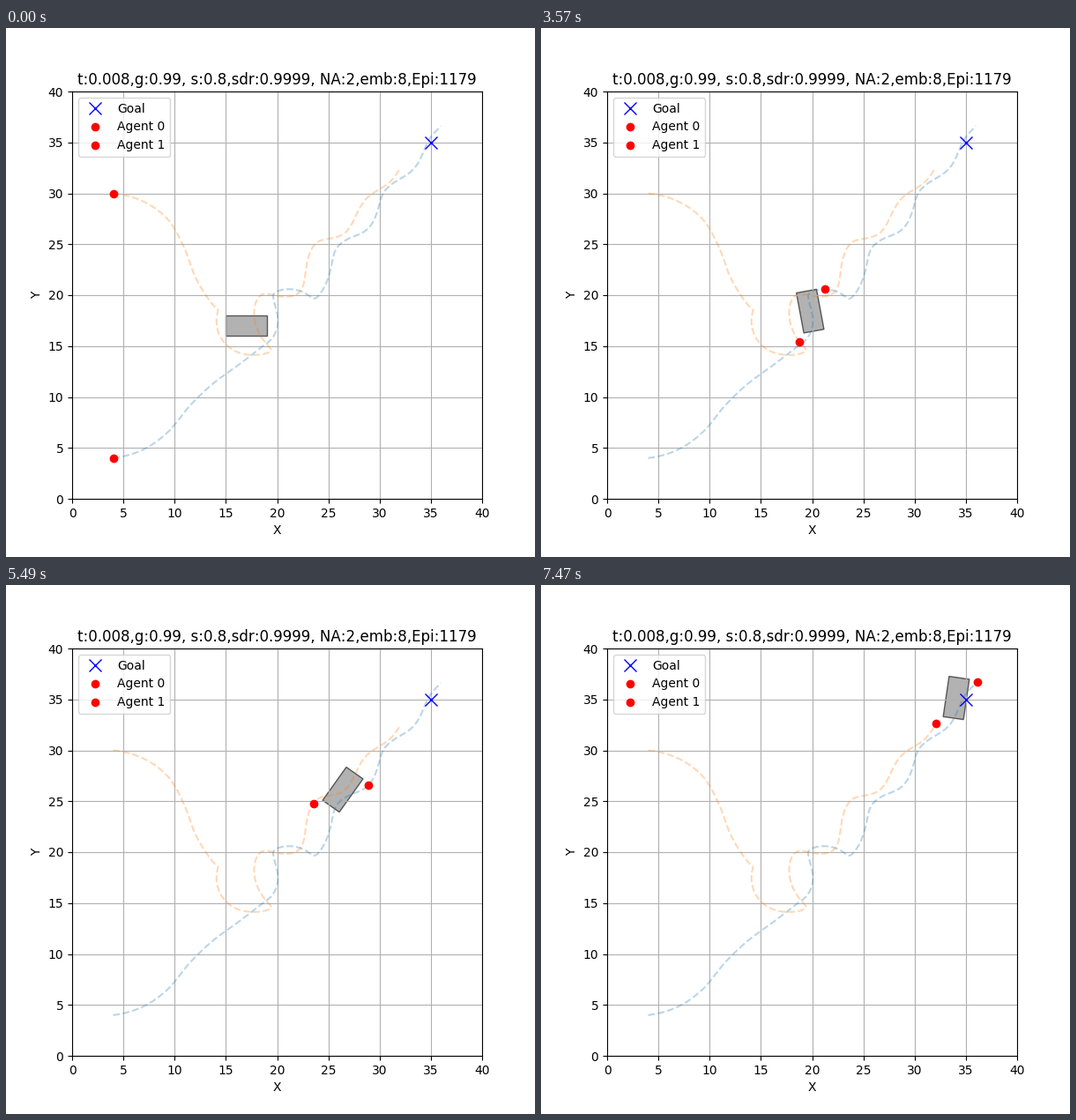
Animation, 600 px wide and 600 px high, one loop 7500 ms. Source, as a matplotlib script:

```python
import numpy as np
import matplotlib.pyplot as plt
from matplotlib.animation import FuncAnimation
from matplotlib.patches import Polygon

plt.rcParams["text.kerning_factor"] = 6

FRAMES, INTERVAL = 250, 30
GRAB = 79.5                          # step at which the agents take the box
REACH = 2.855                        # half the distance between them while carrying
TILT = 36                            # box angle minus the pair's angle
BOX = np.array([(-2, -1), (2, -1), (2, 1), (-2, 1)])
BOX_START = np.array([17, 17])
BOX_SHIFT = np.array([0.45, 0.11])   # box centre relative to the pair's midpoint

# Waypoints passed at even intervals on the way to the box
APPROACH = [
    [(4, 4), (6.97, 4.85), (9.4, 6.61), (11.44, 9.09), (13.68, 11.26),
     (16.3, 13.2), (18.83, 15.17)],
    [(4, 30), (6.97, 29.19), (9.36, 27.41), (10.92, 24.69), (12.03, 21.75),
     (13.33, 19.57), (14.27, 18.59)],
]
# Midpoint of the pair while carrying: step, x, y
CARRY = np.array([
    (GRAB, 16.55, 16.88), (95, 17.81, 16.52), (105, 19.11, 17.01),
    (119, 20, 18.01), (131, 20.65, 19.31), (159, 23.96, 22.42),
    (183, 26.24, 25.71), (206, 29.08, 28.74), (249, 34.11, 34.68),
])
# The pair swings between these turning points: step, degrees
SWING = np.array([(70, -54), (110.5, 86), (136, 0), (160, 50), (184, 18.5),
                  (203, 47), (222, 33), (241, 48), (260, 42)])


def segment(times, t):
    """Index of the interval holding t, its length and the fraction passed."""
    i = int(np.clip(np.searchsorted(times, t) - 1, 0, len(times) - 2))
    h = times[i + 1] - times[i]
    return i, h, (t - times[i]) / h


def spline(times, points, t):
    """Smooth curve through the points."""
    p = np.array(points, float)
    m = np.gradient(p, times, axis=0, edge_order=2)
    i, h, s = segment(times, t)
    r = 1 - s
    return ((1 + 2 * s) * r * r * p[i] + s * r * r * h * m[i]
            + s * s * (3 - 2 * s) * p[i + 1] - s * s * r * h * m[i + 1])


def swing(t):
    """Cosine easing from one turning point to the next."""
    i, _, s = segment(SWING[:, 0], t)
    a, b = SWING[i:i + 2, 1]
    return a + (b - a) * (1 - np.cos(np.pi * s)) / 2


def rotate(points, deg):
    c, s = np.cos(np.radians(deg)), np.sin(np.radians(deg))
    return points @ np.array([[c, s], [-s, c]])


def pose(step):
    """Positions of both agents and the corners of the box."""
    if step < GRAB:
        times = np.linspace(1, GRAB, len(APPROACH[0]))
        return (*(spline(times, path, step) for path in APPROACH), BOX_START + BOX)
    mid = spline(CARRY[:, 0], CARRY[:, 1:], step)
    angle = swing(step)
    arm = rotate(np.array([REACH, 0]), angle)
    return mid + arm, mid - arm, mid + rotate(BOX + BOX_SHIFT, angle + TILT)


poses = [pose(max(i, 1)) for i in range(FRAMES)]

fig, ax = plt.subplots(figsize=(6, 6), dpi=100)
ax.set(xlim=(0, 40), ylim=(0, 40), xlabel="X", ylabel="Y",
       title="t:0.008,g:0.99, s:0.8,sdr:0.9999, NA:2,emb:8,Epi:1179")
ax.set_xticks(range(0, 41, 5))
ax.set_yticks(range(0, 41, 5))
ax.grid(True)

for n in (0, 1):
    ax.plot(*np.array([p[n] for p in poses[1:-1]]).T, "--", color=f"C{n}", alpha=0.3)
ax.plot(35, 35, "bx", markersize=10, label="Goal")
agents = [ax.plot([], [], "ro", label=f"Agent {n}")[0] for n in (0, 1)]
box = ax.add_patch(Polygon(poses[0][2], facecolor="gray", edgecolor="black", alpha=0.6))
ax.legend(loc="upper left")


def update(i):
    *spots, corners = poses[i]
    for agent, (x, y) in zip(agents, spots):
        agent.set_data([x], [y])
    box.set_xy(corners)
    return [*agents, box]


anim = FuncAnimation(fig, update, frames=FRAMES, interval=INTERVAL,
                     repeat=True, repeat_delay=0, blit=False)
plt.show()
```
